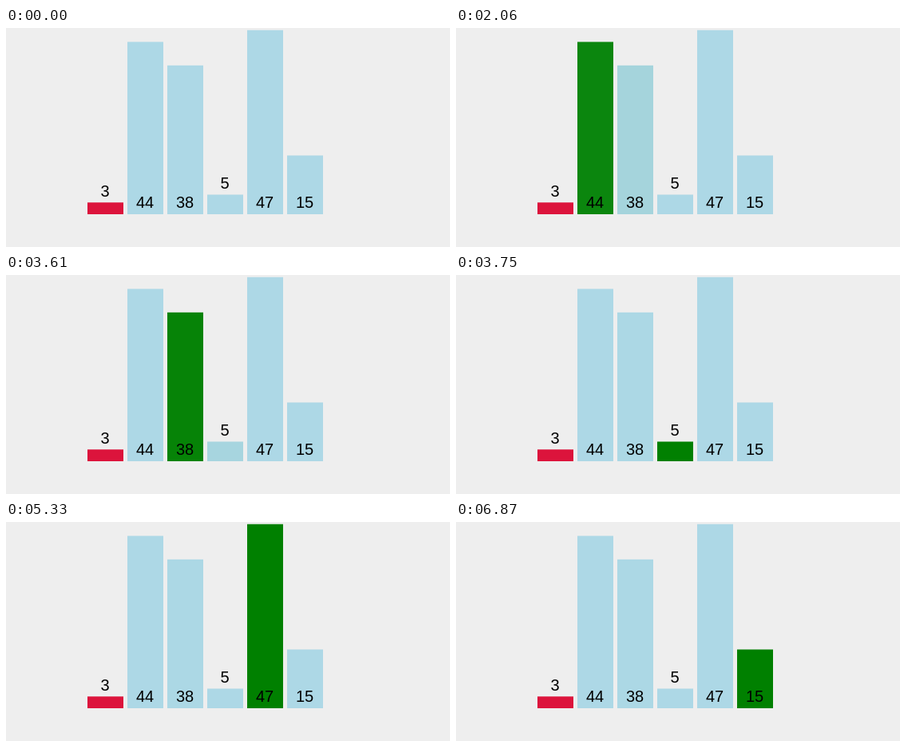
These frames come from a looping animation (556x274 px, 8000 ms). An HTML page:

```html
<!DOCTYPE html>
<html lang="en">
<head>
<meta charset="utf-8">
<title>Selection sort scan</title>
<style>
  html, body { margin: 0; width: 100%; height: 100%; overflow: hidden; background: #eee; }
  svg { display: block; width: 556px; height: 274px; }
  text { font: 20px "Liberation Sans", Helvetica, Arial, sans-serif; text-anchor: middle; fill: #000; }
</style>
</head>
<body>
<svg id="chart" viewBox="0 0 556 274"></svg>
<script>
const LOOP = 8000, FADE = 200;
const BASE = 233, UNIT = 4.9;
const BLUE = [173, 216, 230], GREEN = [0, 128, 0];
const values = [3, 44, 38, 5, 47, 15];

// Each scan move: when its fade begins, first and last visible step, step count
const moves = [
  { begin: 460, first: 500, last: 610, steps: 5 },
  { begin: 2015, first: 2060, last: 2200, steps: 5 },
  { begin: 3570, first: 3610, last: 3750, steps: 6 },
  { begin: 5130, first: 5190, last: 5330, steps: 6 },
  { begin: 6680, first: 6730, last: 6870, steps: 6 }
];

const chart = document.getElementById("chart");

function add(tag, attrs) {
  const el = document.createElementNS("http://www.w3.org/2000/svg", tag);
  for (const key in attrs) el.setAttribute(key, attrs[key]);
  return chart.appendChild(el);
}

const bars = values.map((value, i) => {
  const height = value * UNIT;
  const bar = add("rect", {
    x: 102 + 50 * i, y: BASE - height, width: 45, height,
    fill: i ? "rgb(" + BLUE + ")" : "#dc143c"
  });
  const labelY = height < 30 ? BASE - height - 7.3 : BASE - 8;
  add("text", { x: 124 + 50 * i, y: labelY }).textContent = value;
  return bar;
});

const ease = t => t < 0.5 ? 4 * t ** 3 : 1 - 4 * (1 - t) ** 3;

const mix = p => "rgb(" + BLUE.map((c, i) => Math.round(c + (GREEN[i] - c) * p)) + ")";

// Progress of a move, held at the latest visible step
function progress({ begin, first, last, steps }, time) {
  if (time < first) return 0;
  const gap = (last - first) / (steps - 1);
  const stepTime = k => Math.round((first + k * gap) / 10) * 10;
  let k = steps - 1;
  while (k > 0 && stepTime(k) > time) k--;
  return ease(Math.min(1, (stepTime(k) - begin) / FADE));
}

function draw(time) {
  const done = moves.map(move => progress(move, time));
  done.forEach((p, i) => {
    const next = done[i + 1] || 0;
    bars[i + 1].setAttribute("fill", mix(Math.min(p, 1 - next)));
  });
}

function frame() {
  draw(performance.now() % LOOP);
  requestAnimationFrame(frame);
}
frame();
</script>
</body>
</html>
```
